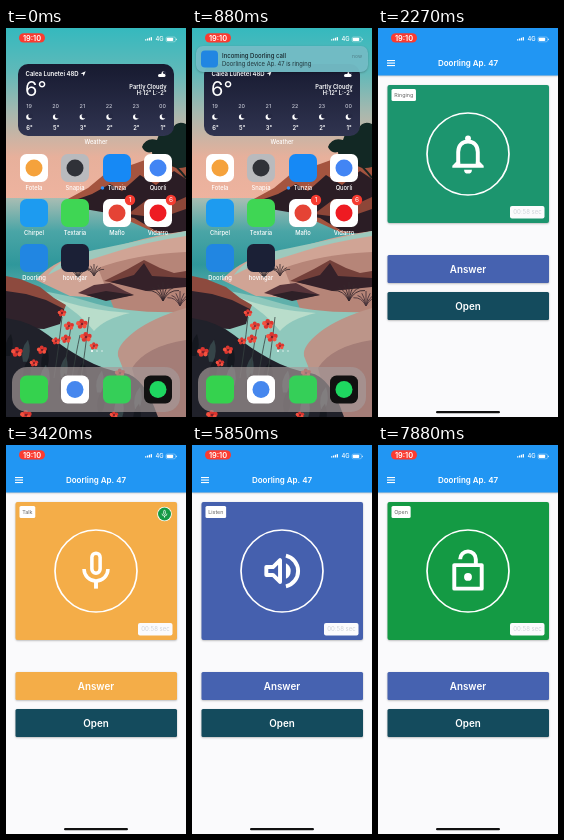
Animation, 180 px wide and 389 px high, one loop 7.94 s. Source, as an HTML page with a canvas:

```html
<!DOCTYPE html>
<html lang="en">
<head>
<meta charset="utf-8">
<title>Door call</title>
<style>
html, body { margin: 0; width: 100%; height: 100%; overflow: hidden; background: #fafafa; }
canvas { display: block; width: 180px; height: 389px; }
</style>
</head>
<body>
<canvas id="stage"></canvas>
<script>
const W = 180, H = 389, LOOP = 7940;
const APP = 'Doorling', UNIT = 'Ap. 47';
const FONT = 'Inter, "Liberation Sans", sans-serif';
const COLS = [28, 69, 111, 152];
const cv = document.getElementById('stage');
const dpr = window.devicePixelRatio || 1;
cv.width = W * dpr;
cv.height = H * dpr;
const c = cv.getContext('2d');

const clamp = v => Math.max(0, Math.min(1, v));
const easeOut = u => 1 - (1 - clamp(u)) ** 3;
const mix = (a, b, p) => a + (b - a) * p;

function box(x, y, w, h, r, color) {
  c.fillStyle = color;
  c.beginPath();
  c.roundRect(x, y, w, h, r);
  c.fill();
}
function disc(x, y, r, color) {
  c.fillStyle = color;
  c.beginPath();
  c.arc(x, y, r, 0, 7);
  c.fill();
}
function shape(color, d) {
  c.fillStyle = color;
  c.fill(new Path2D(d));
}
function line(d, width, color = '#fff') {
  c.strokeStyle = color;
  c.lineWidth = width;
  c.stroke(new Path2D(d));
}
function fade(y0, y1, ...colors) {
  const g = c.createLinearGradient(0, y0, 0, y1);
  colors.forEach((v, i) => g.addColorStop(i / (colors.length - 1), v));
  return g;
}
function text(s, x, y, size, weight = 400, color = '#fff', align = 'left') {
  c.font = `${weight} ${size}px ${FONT}`;
  c.textAlign = align;
  c.fillStyle = color;
  c.fillText(s, x, y);
}
function shadowed(draw) {
  c.save();
  c.shadowColor = 'rgba(0,0,0,.28)';
  c.shadowBlur = 2 * dpr;
  c.shadowOffsetY = .7 * dpr;
  draw();
  c.restore();
}

// Symbols on a 24 unit grid
const symbols = {
  hangup() {
    shape('#fff', 'M.3 11.7Q5 7 12 7T23.7 11.7Q24.3 12.4 23.7 13.1L21.2 15.6Q20.5 16.2 19.8 15.6L17.2 13.7Q16.6 13.4 16.6 12.8V9.7Q12 8.3 7.4 9.7V12.8Q7.4 13.4 6.8 13.7L4.2 15.6Q3.5 16.2 2.8 15.6L.3 13.1Q-.3 12.4 .3 11.7Z');
  },
  bell() {
    line('M7 18V11C7 8 8.8 5.6 12 5.6S17 8 17 11V18', 2);
    shape('#fff', 'M4 19V18L6 16H8V17H16V16H18L20 18V19Z');
    disc(12, 4, 1.5, '#fff');
    shape('#fff', 'M10 20H14A2 2 0 0 1 10 20Z');
  },
  mic() {
    line('M9.9 5A2.1 2.1 0 0 1 14.1 5V11A2.1 2.1 0 0 1 9.9 11Z', 1.8);
    line('M5.9 11A6.1 6.1 0 0 0 18.1 11', 1.8);
    line('M12 17V21', 2);
  },
  speaker() {
    line('M4 10H7.4L11 6.4V17.6L7.4 14H4Z', 2);
    shape('#fff', 'M14 8A4.5 4.5 0 0 1 14 16Z');
    line('M14 4.2A8 8 0 0 1 14 19.8', 2);
  },
  unlock() {
    line('M5 9H19V21H5Z', 2);
    line('M8 6A4 4 0 0 1 16 6V9', 2);
    disc(12, 15, 2, '#fff');
  }
};
function symbol(name, x, y, k) {
  c.save();
  c.translate(x, y);
  c.scale(k, k);
  c.translate(-12, -12);
  c.lineJoin = 'round';
  symbols[name]();
  c.restore();
}

function statusBar() {
  box(13, 5.2, 26, 9.4, 4.7, '#fb3b30');
  text('19:10', 26, 12.6, 7.4, 600, '#fff', 'center');
  for (let i = 0; i < 4; i++) box(139 + i * 1.9, 12.6 - i * .7 - 1.4, 1.3, 1.4 + i * .7, .3, '#fff');
  text('4G', 149.5, 13, 5.8, 500);
  c.globalAlpha *= .55;
  c.strokeStyle = '#fff';
  c.lineWidth = .6;
  c.beginPath();
  c.roundRect(160, 9, 9.5, 4.8, 1.4);
  c.stroke();
  c.globalAlpha /= .55;
  box(160.7, 9.7, 6.5, 3.4, .8, '#fff');
  box(170, 10.6, .7, 1.6, .4, '#fff');
}

function flower(x, y, r) {
  for (let i = 0; i < 5; i++) {
    const a = i * 1.257 - .4;
    disc(x + Math.cos(a) * r, y + Math.sin(a) * r * .75, r * .62, i % 2 ? '#f4513f' : '#dc352f');
  }
  disc(x, y, r * .35, '#7c1f2a');
}
function grass(x, y, size, color) {
  for (let i = -3; i <= 3; i++) {
    line(`M${x} ${y}Q${x + i * size * .1} ${y - size * .6} ${x + i * size * .28} ${y - size + Math.abs(i) * size * .15}`, .9, color);
  }
}
function wallpaper() {
  // sky and sea
  c.fillStyle = fade(0, 172, '#35b9be', '#5fb9b9', '#a9b8ae', '#e7b09b', '#eeb39f');
  c.fillRect(0, 0, W, 172);
  c.fillStyle = fade(170, 270, '#a9bdb3', '#4aa5a6', '#2f979b', '#5fb0ab');
  c.fillRect(0, 170, W, 219);
  // cliffs and tree
  shape('#a4543f', 'M60 172L82 160L100 145L128 136L150 128L180 134V205H150L112 188Z');
  shape('#2b1d25', 'M55 177L86 166L104 156L116 163L134 147L150 157L168 143L180 151V208L150 203L128 190L96 184Z');
  shape('#8d4638', 'M122 186L142 171L160 178L180 169V181L154 190Z');
  shape('#122824', 'M136 119Q140 109 151 112Q154 99 166 101Q171 92 180 96V139Q166 143 160 132Q146 136 146 124Q139 126 136 119Z');
  line('M180 150Q172 139 160 130', 2, '#182523');
  // beach
  shape('#d0a495', 'M180 203Q150 207 126 214T70 228Q46 234 30 252L64 268L180 275Z');
  shape('#9dc9bd', 'M180 208Q140 214 112 223T56 240L42 247Q54 229 88 222T180 203Z');
  shape('#b68578', 'M92 240Q130 226 180 224V286H110Z');
  shape('#74403a', 'M98 253L122 241L138 232L154 240L168 245L180 243V258L140 261Z');
  shape('#352129', 'M104 254L128 247L138 235L146 248L180 250V259L140 263Z');
  shape('#57343a', 'M72 265L88 257L104 255L119 263L128 267L100 272Z');
  shape('#2e2027', 'M80 267L100 263L128 267L100 273Z');
  grass(72, 250, 16, '#3c3437');
  grass(88, 248, 12, '#4a383a');
  grass(157, 273, 19, '#36272d');
  grass(174, 278, 15, '#48343a');
  // inlet and near shore
  shape('#8fc8bc', 'M0 259Q46 262 84 274T180 284V298Q138 302 122 318T138 345H40Z');
  shape('#b9ddcb', 'M48 270Q80 282 124 285Q98 291 88 303Q74 285 48 270Z');
  shape('#bc9589', 'M180 280Q146 290 128 304T112 328L136 389H180Z');
  shape('#a47d77', 'M180 312Q140 318 126 340L140 389H180Z');
  // left bank
  shape('#8d4a3e', 'M0 248L14 251L34 259L48 270L60 277L56 287L0 284Z');
  shape('#30222b', 'M0 263L20 266L40 272L58 281L54 296L38 301L0 299Z');
  shape('#20212a', 'M0 290Q26 294 42 307T78 331T118 345T152 389H0Z');
  for (let i = 0; i < 18; i++) {
    const x = (i * 37) % 130, y = 306 + (x * .28) + (i * 23) % 36;
    shape(i % 2 ? '#354448' : '#15181f', `M${x} ${y + 22}Q${x - 3} ${y + 9} ${x + 5} ${y}Q${x + 9} ${y + 12} ${x + 4} ${y + 22}Z`);
  }
  for (let i = 0; i < 4; i++) {
    const x = 56 + i * 9;
    line(`M${x} ${289 + i % 3 * 9}Q${x - 4} 325 ${x - 8} 350`, .8, '#35413f');
  }
  [[56, 285], [63, 298], [76, 296], [50, 313], [60, 311], [80, 309], [88, 318], [36, 322], [11, 324], [28, 335], [114, 345], [20, 387], [108, 387]]
    .forEach(([x, y], i) => flower(x, y, 2.7 + i % 3 * .5));
}

function moon(x, y, r) {
  disc(x, y, r, '#fff');
  disc(x + r * .55, y - r * .35, r * .85, '#262943');
}
function weather() {
  box(12, 36, 156, 72, 10, fade(36, 108, '#171a30', '#303450'));
  const place = 'Calea Lunetei 48D';
  text(place, 19.5, 47.7, 6, 600);
  const x = 21.5 + c.measureText(place).width;
  shape('#fff', `M${x} 45.6l5-2.4l-2 5l-.7-2.2z`);
  text('6°', 19, 67.5, 20, 400);
  moon(157.5, 45.3, 2);
  box(152, 46, 7.5, 3, 1.5, '#fff');
  text('Partly Cloudy', 160.5, 60.5, 5.7, 600, '#fff', 'right');
  text('H:12° L:-2°', 160.5, 67.4, 5.7, 600, '#fff', 'right');
  ['19', '20', '21', '22', '23', '00'].forEach((h, i) => {
    const hx = 23 + i * 26.7;
    text(h, hx, 80, 5.4, 500, '#c3c5d2', 'center');
    moon(hx, 89, 2.8);
    text([6, 5, 3, 2, 2, 1][i] + '°', hx + .5, 101.5, 5.8, 600, '#fff', 'center');
  });
  text('Weather', 90, 116, 5.7, 500, '#fff', 'center');
}

// label, tile colour, optional dot colour, optional badge
const APPS = [
  ['Fotela', '#fff', '#f5a23c'], ['Snapia', '#b9babd', '#303238'], ['Tunzia', '#1689f5'], ['Quorli', '#fff', '#4285f4'],
  ['Chirpel', '#1d9bf0'], ['Textaria', '#3fd654'], ['Maflo', '#fff', '#e54335', '1'], ['Vidarro', '#fff', '#ee1b22', '6'],
  [APP, '#2186e2'], ['hovingar', '#1b2036']
];
const DOCK = [['', '#35d24e'], ['', '#fff', '#4687ee'], ['', '#35cf58'], ['', '#111', '#1ed760']];

function tile([label, color, dot, badge], x, y) {
  box(x - 14, y - 14, 28, 28, 6.5, color);
  if (dot) disc(x, y, 8.5, dot);
  if (label) text(label, x, y + 21.8, 5.8, 500, '#fff', 'center');
  if (badge) {
    disc(x + 13, y - 13, 5.2, '#f53b30');
    text(badge, x + 13, y - 10.6, 6.5, 400, '#fff', 'center');
  }
}
function homeIcons() {
  weather();
  APPS.forEach((a, i) => tile(a, COLS[i % 4], 140 + Math.floor(i / 4) * 45));
  disc(96.5, 160, 1.7, '#2d94ff');
  for (let i = 0; i < 3; i++) disc(86 + i * 5, 323, 1.1, i ? 'rgba(255,255,255,.4)' : '#fff');
  box(6, 339, 168, 45, 15, 'rgba(166,154,154,.68)');
  DOCK.forEach((a, i) => tile(a, COLS[i], 361.5));
}

function banner(t) {
  const p = t < 1050 ? easeOut((t - 520) / 330) : 1 - easeOut((t - 1050) / 200);
  if (p <= 0) return;
  const y = mix(-30, 18, p);
  shadowed(() => box(4, y, 172, 26, 7, 'rgba(116,190,200,.95)'));
  box(9, y + 4.5, 17, 17, 4, '#2186e2');
  text(`Incoming ${APP} call`, 30, y + 12.2, 6, 500, '#17262c');
  text(`${APP} device ${UNIT} is ringing`, 30, y + 20, 5.8, 400, '#20343a');
  text('now', 170, y + 12, 5, 400, '#4f7f88', 'right');
}

function home(t, p) {
  c.save();
  c.translate(90, 194.5);
  c.scale(1 + .14 * p, 1 + .14 * p);
  c.translate(-90, -194.5);
  if (p > 0) c.filter = `blur(${4 * p * dpr}px)`;
  wallpaper();
  c.filter = 'none';
  c.globalAlpha = clamp(1 - p * 1.6);
  if (c.globalAlpha > 0) homeIcons();
  c.restore();
  if (p > 0) {
    c.fillStyle = `rgba(22,16,24,${.68 * p})`;
    c.fillRect(0, 0, W, H);
  } else {
    statusBar();
  }
  banner(t);
}

// start time, label, panel colour, symbol
const STATES = [
  [0, 'Waiting', '#0d4f60', 'hangup'],
  [1850, 'Ringing', '#1c956e', 'bell'],
  [2900, 'Talk', '#f4ad48', 'mic'],
  [4600, 'Listen', '#4560ae', 'speaker'],
  [6250, 'Open', '#149a44', 'unlock']
];

function app(t) {
  const [, label, color, icon] = STATES.filter(s => s[0] <= t).pop();
  const talking = label === 'Talk';
  c.fillStyle = '#fafafc';
  c.fillRect(0, 0, W, H + 10);
  shadowed(() => box(0, 0, W, 47.5, 0, '#2196f3'));
  statusBar();
  for (let i = 0; i < 3; i++) box(9, 32 + i * 2.5, 8, 1.1, 0, '#fff');
  text(`${APP} ${UNIT}`, 90, 38, 8, 600, '#fff', 'center');

  shadowed(() => box(9.5, 57, 161.5, 138, 2, color));
  c.strokeStyle = '#fff';
  c.lineWidth = 1.7;
  c.beginPath();
  c.arc(90, 126, 41, 0, 7);
  c.stroke();
  symbol(icon, 90, icon === 'hangup' ? 127 : 126, 1.96);

  c.font = `400 5.4px ${FONT}`;
  box(13.5, 61, c.measureText(label).width + 5.4, 12, 1.5, '#fff');
  text(label, 16.2, 69, 5.4, 400, '#666');
  box(132, 178, 34.5, 12.5, 2, '#fbfbfd');
  text('00:58 sec', 149.5, 186.4, 6, 400, '#d0d4da', 'center');
  if (talking) {
    disc(158.5, 69, 7.3, '#fff');
    disc(158.5, 69, 6.5, '#149a44');
    symbol('mic', 158.5, 69, .4);
  }
  shadowed(() => box(9.5, 227, 161.5, 28, 1.5, talking ? '#f4ad48' : '#4662b0'));
  text('Answer', 90, 244.7, 9.8, 600, '#fff', 'center');
  shadowed(() => box(9.5, 264, 161.5, 28, 1.5, '#144b5d'));
  text('Open', 90, 281.7, 9.8, 600, '#fff', 'center');
}

function windowAt(t, p) {
  const x = 14 * (1 - p), y = 217 * (1 - p);
  const w = mix(28, W, 1 - (1 - p) * .78), h = mix(28, H, p);
  const k = w / W;
  c.save();
  c.beginPath();
  c.roundRect(x, y, w, h, p < 1 ? mix(7, 19, p) : 0);
  c.clip();
  c.translate(x, y);
  c.scale(k, k);
  app(t);
  c.restore();
  if (p < .5) {
    c.globalAlpha = 1 - p * 2;
    box(x, y, w, h, 7, '#2186e2');
  }
  c.globalAlpha = clamp((p - .85) / .15);
  box(x + 58 * k, y + h - 6 * k, 64 * k, 2.3 * k, 1.2 * k, '#111');
  c.globalAlpha = 1;
}

function draw(t) {
  c.setTransform(dpr, 0, 0, dpr, 0, 0);
  c.clearRect(0, 0, W, H);
  const p = easeOut((t - 1100) / 458);
  if (p < 1) home(t, p);
  if (p > 0) windowAt(t, p);
}

const start = performance.now();
function tick() {
  draw((performance.now() - start) % LOOP);
  requestAnimationFrame(tick);
}
tick();
</script>
</body>
</html>
```
